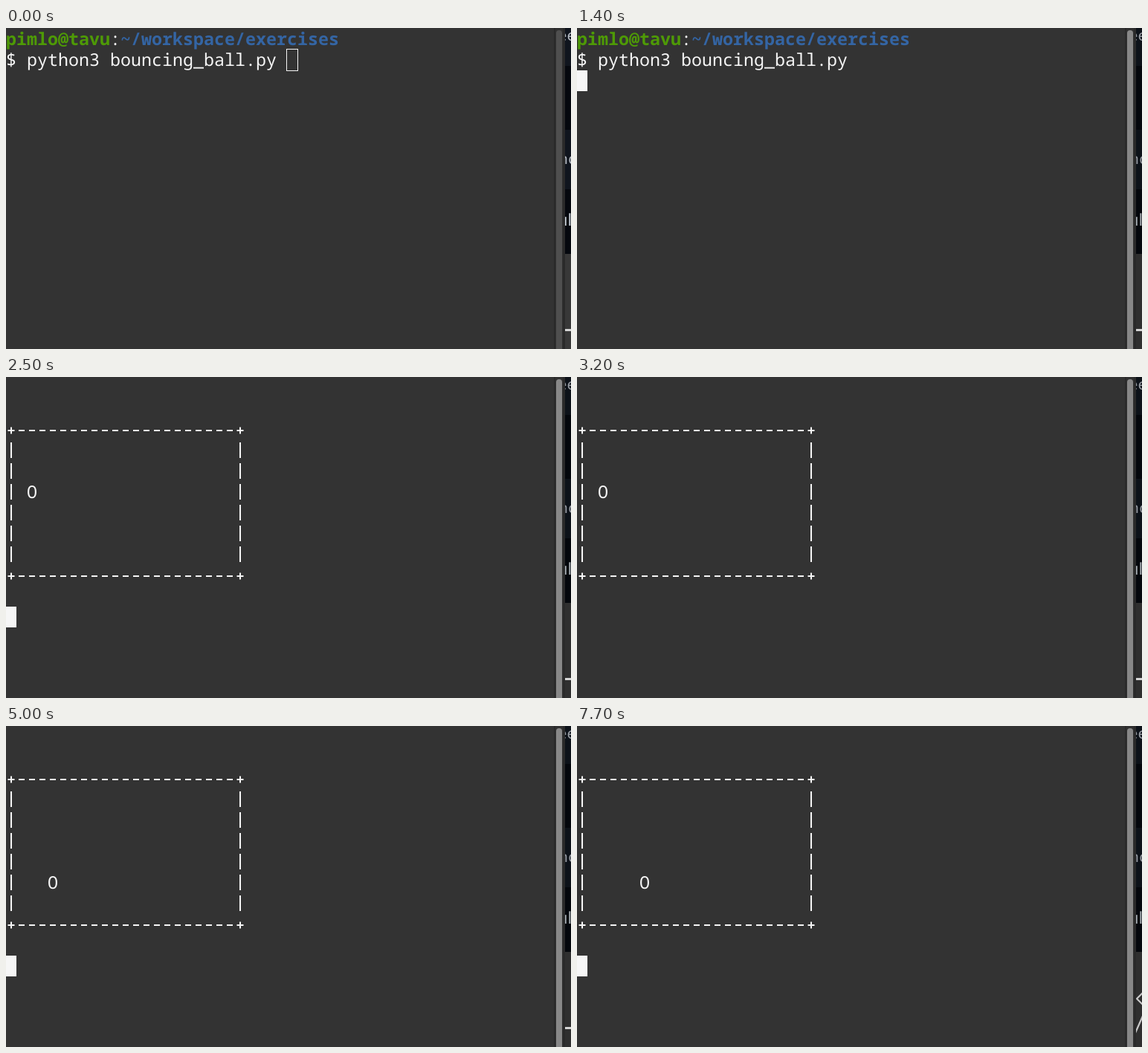
Recreate the animation shown at these times as an HTML page. Size 760x432 px, loop 8000 ms.

```html
<!DOCTYPE html>
<html lang="en">
<head>
<meta charset="utf-8">
<title>Bouncing ball in a terminal</title>
<style>
html, body { margin: 0; width: 100%; height: 100%; overflow: hidden; background: #333; }
svg { display: block; width: 760px; height: 432px; }
text {
  font: 23.3333px "Noto Sans Mono", "DejaVu Sans Mono", monospace;
  fill: #f6f6f6; white-space: pre; text-rendering: geometricPrecision;
}
.bold { font-weight: 700; }
.user { fill: #4e9a06; }
.path { fill: #3465a4; }
.side text { font-size: 20px; fill: #b4bac2; }
.side .head { font: 22px "Noto Sans", sans-serif; fill: #c9d1d9; }
.cursor { fill: #f6f6f6; }
.edge { stroke: #f6f6f6; stroke-width: 2; fill: none; }
.icon { stroke: #c9c9c9; stroke-width: 2.2; fill: none; }

/* Every part shares one 8 s clock; 1.25% is 100 ms. */
.anim { animation: 8s step-end infinite; }
#hollow { animation-name: hollow; }
#typed { animation-name: typed; }
#prompt { animation-name: prompt; }
#start { animation-name: start; }
#board { animation-name: board; }
#blink { animation-name: blink; }
#ball { animation-name: ball; }
#low { animation-name: low; }
#thumb { animation-name: thumb; }
#shade { animation-name: shade; }
#dash { animation-name: dash; }
#code { animation-name: code; }

@keyframes hollow { 0% { opacity: 1 } 3.75%, 100% { opacity: 0 } }
@keyframes typed { 0% { opacity: 0 } 3.75% { opacity: 1 } 11.25%, 100% { opacity: 0 } }
@keyframes prompt { 0% { opacity: 1 } 18.75%, 100% { opacity: 0 } }
@keyframes start { 0% { opacity: 0 } 17.5% { opacity: 1 } 18.75%, 100% { opacity: 0 } }
@keyframes board { 0% { opacity: 0 } 18.75%, 100% { opacity: 1 } }
@keyframes blink {
  0%, 25%, 40%, 55%, 70%, 85% { opacity: 0 }
  18.75%, 31.25%, 47.5%, 62.5%, 77.5%, 92.5%, 100% { opacity: 1 }
}
@keyframes ball {
  0% { transform: translate(0, 0); opacity: 1 }
  31.25% { transform: translate(14px, 28px); opacity: 1 }
  45% { transform: translate(28px, 56px); opacity: 1 }
  58.75% { transform: translate(42px, 84px); opacity: 1 }
  72.5% { transform: translate(56px, 112px); opacity: 0 }
  86.25%, 100% { transform: translate(70px, 84px); opacity: 1 }
}
@keyframes low { 0% { opacity: 0 } 72.5% { opacity: 1 } 86.25%, 100% { opacity: 0 } }
@keyframes thumb { 0% { fill: #4f4f4f } 3.75% { fill: #6c6c6c } 5%, 100% { fill: #888 } }
@keyframes shade { 0% { opacity: 0 } 3.75% { opacity: .08 } 5%, 100% { opacity: .16 } }
@keyframes dash { 0% { opacity: 1 } 95% { opacity: .5 } 96.25%, 100% { opacity: 0 } }
@keyframes code { 0% { opacity: 0 } 95% { opacity: .5 } 96.25%, 100% { opacity: 1 } }
</style>
</head>
<body>
<svg viewBox="0 0 760 432">
  <rect width="760" height="432" fill="#333"/>

  <g id="prompt" class="anim">
    <text y="23"><tspan class="bold user">pimlo@tavu</tspan>:<tspan class="bold path">~/workspace/exercises</tspan></text>
    <text y="51">$ python3 bouncing_ball.py</text>
  </g>
  <rect id="hollow" class="anim" x="377.5" y="28.5" width="15" height="29" fill="none" stroke="#f6f6f6"/>
  <rect id="typed" class="anim cursor" x="378" y="29" width="14" height="28"/>
  <rect id="start" class="anim cursor" y="57" width="14" height="28"/>

  <g id="board" class="anim">
    <!-- dashed top and bottom, one bar per text row on the sides -->
    <path class="edge" stroke-width="1.8" stroke-dasharray="8 6" d="M17 72H306M17 268H306"/>
    <path class="edge" stroke-dasharray="21 7" d="M7 88V249M315 88V249"/>
    <path class="edge" d="M2.5 72h9M7 67.5v9M310.5 72h9M315 67.5v9M2.5 268h9M7 263.5v9M310.5 268h9M315 263.5v9"/>
    <text id="ball" class="anim" x="14" y="135">O</text>
    <text id="low" class="anim" x="70" y="247">o</text>
    <rect id="blink" class="anim cursor" y="309" width="14" height="28"/>
  </g>

  <!-- window behind -->
  <svg class="side" x="752" width="8" height="432" viewBox="752 0 8 432">
    <rect x="752" width="8" height="432" fill="#383838"/>
    <rect x="752" width="8" height="304" fill="#10151e"/>
    <path fill="#05080e" d="M752 51h8v86h-8zM752 217h8v87h-8z"/>
    <text x="742.5" y="17">ee</text>
    <text x="743.7" y="183">nc</text>
    <text class="head" x="742" y="266">ul</text>
    <rect id="shade" class="anim" x="752" width="8" height="432"/>
    <rect id="dash" class="anim" x="752" y="405" width="8" height="3" fill="#d4d4d4"/>
    <path id="code" class="anim icon" d="M762 358L753 367L762 376M762 388L751 413"/>
  </svg>

  <!-- scrollbar -->
  <rect x="737" width="15" height="432" fill="#2a2a2a"/>
  <rect x="739" width="10" height="432" fill="#303030"/>
  <rect id="thumb" class="anim" x="740" y="3" width="8" height="440" rx="4"/>
</svg>
</body>
</html>
```
